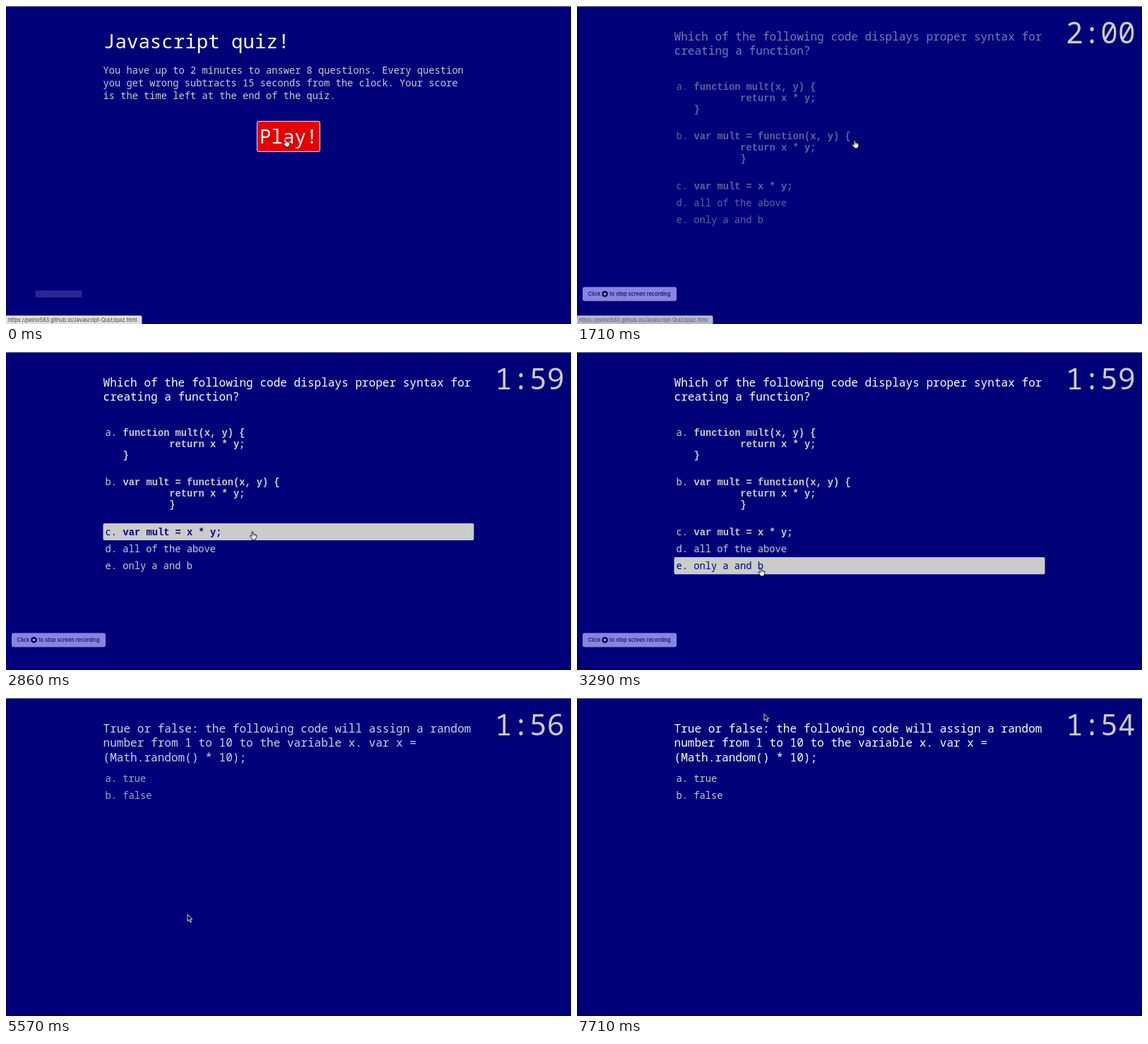
An HTML page with a canvas that plays this animation: 800 by 451 pixels, repeating every 8 s.

```html
<!DOCTYPE html>
<html lang="en">
<head>
<meta charset="utf-8">
<title>Javascript quiz</title>
<style>
html, body { margin: 0; width: 100%; height: 100%; overflow: hidden; background: #000078; }
canvas { display: block; width: 800px; height: 451px; }
</style>
</head>
<body>
<canvas id="stage"></canvas>
<script>
const LOOP = 8000, STEP = 1000 / 7;
const NAVY = '#000078', GREY = '#cbcbcb', WHITE = '#fff';
const MONO = '"Noto Sans Mono", "DejaVu Sans Mono", monospace';
const CODE = '"Liberation Mono", "Courier New", monospace';
const SANS = 'Inter, "Liberation Sans", sans-serif';

const QUIZ_AT = 1500, SECOND_AT = 5080;   // page changes
const CLOCK_START = 1450;

const canvas = document.getElementById('stage');
const dpr = window.devicePixelRatio || 1;
canvas.width = 800 * dpr;
canvas.height = 451 * dpr;
const ctx = canvas.getContext('2d');

const clamp = v => Math.max(0, Math.min(1, v));
const progress = (t, from, length) => clamp((t - from) / length);
const easeOut = p => 1 - (1 - p) ** 2;
const smooth = p => p * p * (3 - 2 * p);

function text(str, x, y, size, color, weight = 400, family = MONO) {
  ctx.font = `${weight} ${size}px ${family}`;
  ctx.fillStyle = color;
  ctx.fillText(str, x, y);
}

function lines(list, x, y, gap, ...style) {
  list.forEach((s, i) => text(s, x, y + i * gap, ...style));
}

function box(x, y, w, h, r, color) {
  ctx.beginPath();
  ctx.roundRect(x, y, w, h, r);
  ctx.fillStyle = color;
  ctx.fill();
}

function disc(x, y, r, color) {
  ctx.beginPath();
  ctx.arc(x, y, r, 0, Math.PI * 2);
  ctx.fillStyle = color;
  ctx.fill();
}

const first = {
  question: ['Which of the following code displays proper syntax for', 'creating a function?'],
  answers: [
    { top: 101.5, h: 70, code: ['function mult(x, y) {', '        return x * y;', '}'] },
    { top: 171.5, h: 70.5, code: ['var mult = function(x, y) {', '        return x * y;', '        }'] },
    { top: 243, h: 24, code: ['var mult = x * y;'] },
    { top: 267, h: 24, label: 'all of the above' },
    { top: 291, h: 24.3, label: 'only a and b' }
  ]
};

const second = {
  question: ['True or false: the following code will assign a random',
    'number from 1 to 10 to the variable x. var x =', '(Math.random() * 10);'],
  answers: [
    { top: 101.5, h: 24, label: 'true' },
    { top: 126, h: 24, label: 'false' }
  ]
};

function drawIntro() {
  text('Javascript quiz!', 138, 60, 27.45, WHITE);
  lines(['You have up to 2 minutes to answer 8 questions. Every question',
    'you get wrong subtracts 15 seconds from the clock. Your score',
    'is the time left at the end of the quiz.'], 137.5, 96, 18, 13.72, GREY, 300);
  box(355, 163, 90, 44, 3.5, '#f4dcec');
  box(356, 164, 88, 42, 2.5, '#e60000');
  text('Play!', 359, 195, 27.45, WHITE, 300);
}

function drawQuestion(page, alpha, hoverY) {
  ctx.globalAlpha = alpha;
  lines(page.question, 137.5, 48.5, 20.8, 16.08, WHITE);
  page.answers.forEach((a, i) => {
    const hot = hoverY >= a.top && hoverY < a.top + a.h;
    const ink = hot ? NAVY : GREY;
    const base = a.top + 17.3;
    if (hot) box(137.5, a.top, 525, a.h, 2, GREY);
    text('abcde'[i] + '.', 140.5, base, 13.72, ink, 300);
    if (a.code) lines(a.code, 165.5, base, 15.9, 13.72, ink, 700, CODE);
    else text(a.label, 165.2, base, 13.72, ink, 300);
  });
  ctx.globalAlpha = 1;
}

function drawClock(t) {
  const left = 120 - Math.floor((t - CLOCK_START) / 1000);
  const sec = String(left % 60).padStart(2, '0');
  text(`${Math.floor(left / 60)}:${sec}`, 692, 53, 41.15, GREY, 300);
}

// Recording notice, which grows in at the start and shrinks away later
function drawNotice(t) {
  const shown = Math.min(easeOut(progress(t, -70, 430)), 1 - progress(t, 4800, 430));
  if (shown <= 0) return;
  const scale = 0.28 + 0.72 * shown;
  ctx.save();
  ctx.translate(74.5, 408.3);
  ctx.scale(scale, scale);
  ctx.translate(-74.5, -408.3);
  ctx.globalAlpha = shown;
  box(8, 398.5, 133, 20, 3, '#8983e2');
  text('Click', 15.5, 411, 7.4, '#120f4c', 500, SANS);
  text('to stop screen recording', 46.3, 411, 7.4, '#120f4c', 500, SANS);
  disc(39.5, 408.4, 4.4, '#120f4c');
  disc(39.5, 408.4, 1.6, '#b5b0f2');
  ctx.restore();
}

function drawLink(t) {
  ctx.globalAlpha = 1 - progress(t, 1650, 350);
  box(-3, 439, 195.5, 15, 2.5, '#dedee2');
  text('https://pelno583.github.io/Javascript-Quiz/quiz.html', 3, 448, 7.4, '#45454a', 400, SANS);
  ctx.globalAlpha = 1;
}

// time, x, y of the pointer tip
const path = [
  [0, 396, 188], [1290, 395, 189], [1710, 393, 190], [1860, 393, 190],
  [2430, 400, 170], [2710, 400, 170], [3000, 300, 335], [3285, 260, 306],
  [4425, 256, 309], [5000, 256, 309], [5140, 257, 307], [6430, 257, 307],
  [7140, 265, 22.5], [LOOP, 265, 22.5]
];

function pointer(t) {
  const i = path.findIndex(k => k[0] > t);
  const [t0, x0, y0] = path[i - 1], [t1, x1, y1] = path[i];
  const p = smooth((t - t0) / (t1 - t0));
  return { x: x0 + (x1 - x0) * p, y: y0 + (y1 - y0) * p };
}

const arrow = new Path2D('M0 0V9.4L2.2 7.4L3.8 11.2L5.5 10.5L3.9 6.8H6.8Z');
const hand = new Path2D('M-.8 .8Q0-.5 .9.8L1.2 4Q2.4 3.2 3 4.4Q4.2 3.7 4.7 5Q6 4.6 6 6Q6 9 4.6 10.6V11.8H-.4V10.8L-3.4 7.2Q-3.8 5.6-2.2 6L-.8 7.2Z');

function drawPointer({ x, y }, isHand) {
  ctx.save();
  ctx.translate(x, y);
  ctx.lineJoin = 'round';
  ctx.lineWidth = 0.9;
  ctx.fillStyle = isHand ? '#f2f2f2' : '#08081c';
  ctx.strokeStyle = isHand ? '#111' : '#eee';
  const shape = isHand ? hand : arrow;
  ctx.fill(shape);
  ctx.stroke(shape);
  if (isHand) {
    ctx.lineWidth = 0.5;
    ctx.stroke(new Path2D('M1.2 4V6.4M3 4.4V6.6M4.7 5V6.8'));
  }
  ctx.restore();
}

function draw(t) {
  const tip = pointer(t);
  ctx.setTransform(dpr, 0, 0, dpr, 0, 0);
  ctx.fillStyle = NAVY;
  ctx.fillRect(0, 0, 800, 451);
  ctx.fillStyle = '#85859f';
  ctx.fillRect(0, 0, 800, 1);

  if (t < QUIZ_AT) {
    drawIntro();
  } else {
    if (t < SECOND_AT) {
      drawQuestion(first, easeOut(progress(t, 1440, 1000)), t > 1850 ? tip.y + 3 : -1);
    } else {
      drawQuestion(second, easeOut(progress(t, 5010, 1000)), -1);
    }
    drawClock(t);
  }
  drawNotice(t);
  if (t < 2000) drawLink(t);
  drawPointer(tip, t < SECOND_AT);
}

const start = performance.now();
function tick(now) {
  const t = Math.max(0, now - start) % LOOP;
  draw(Math.min(55, Math.floor((t + 6) / STEP)) * STEP);   // seven pictures a second
  requestAnimationFrame(tick);
}
draw(0);
requestAnimationFrame(tick);
</script>
</body>
</html>
```
